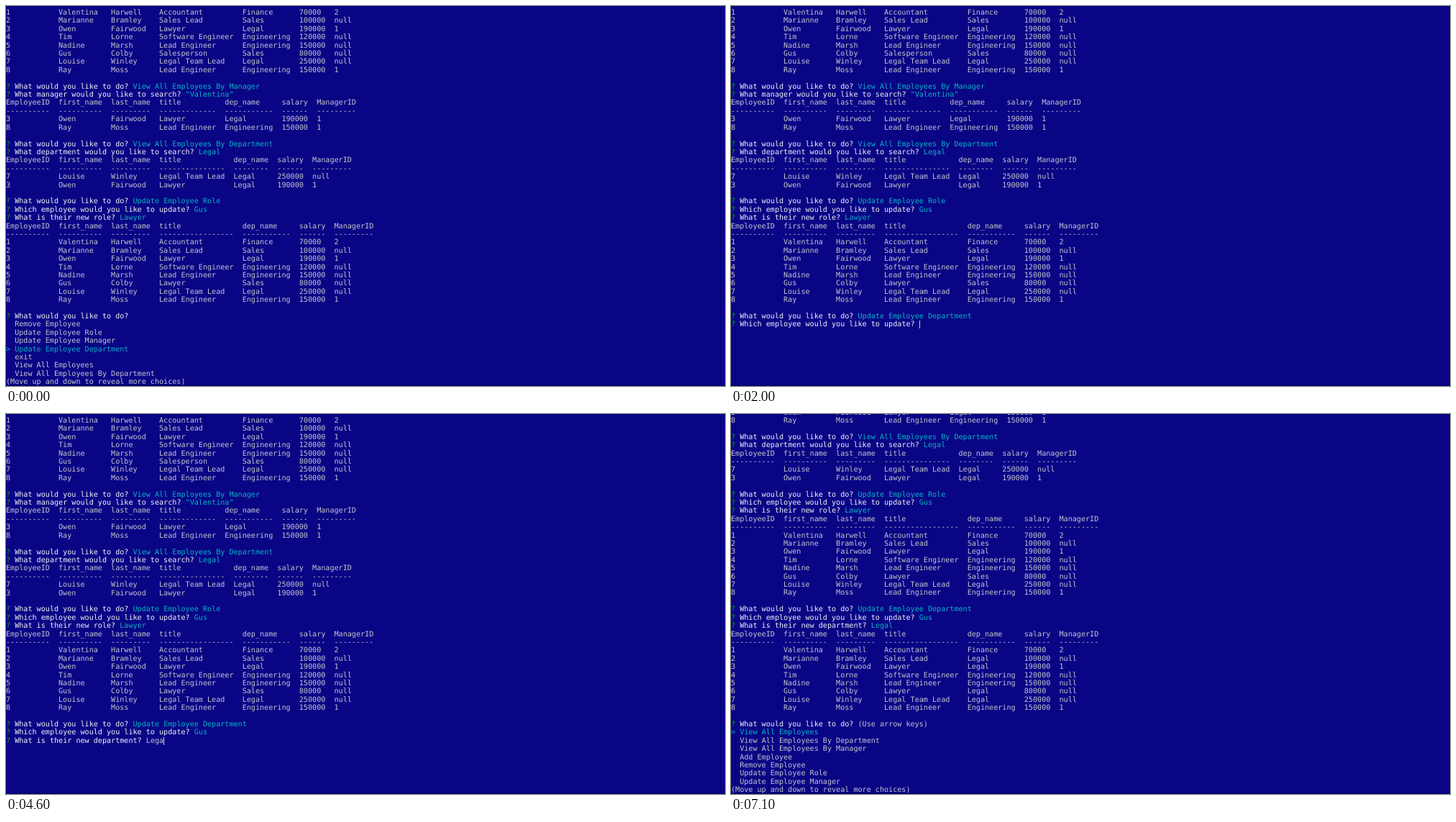
These frames come from a looping animation (1000x528 px, 7.2 s). An HTML page:

```html
<!DOCTYPE html>
<html lang="en">
<head>
<meta charset="utf-8">
<title>Employee tracker</title>
<style>
  html, body { margin: 0; width: 100%; height: 100%; overflow: hidden; background: #090585; }
  #stage { position: relative; width: 1000px; height: 528px; overflow: hidden; }
  #stage::after { content: ""; position: absolute; left: 0; right: 0; bottom: 0; height: 1px; background: #05035c; }
  #term {
    position: absolute; left: 0; margin: 0; color: #c6c6ce;
    font: 10.12px/11.41px "DejaVu Sans Mono", "Liberation Mono", monospace;
    text-rendering: geometricPrecision; font-variant-ligatures: none;
  }
  .ask { color: #f4f4f8; }
  .mark { color: #12a02a; }
  .pick { color: #08b4c4; }
  .caret { position: absolute; width: 1px; height: 11px; background: #d0d0d8; }
  #mouse {
    position: absolute; left: 152px; top: 480px; width: 6px; height: 11px;
    animation: drift 7.2s linear infinite;
  }
  @keyframes drift {
    0%, 2.77% { visibility: hidden; }
    2.78%, 9.8% { visibility: visible; transform: none; }
    15.2%, 22.21% { visibility: visible; transform: translate(1px, -1px); }
    22.22%, 100% { visibility: hidden; transform: translate(1px, -1px); }
  }
</style>
</head>
<body>
<div id="stage">
  <pre id="term"></pre>
  <svg id="mouse" viewBox="0 0 6 11"><path d="M1 .5H5M3 .5V10.5M1 10.5H5" fill="none" stroke="#04022c"/></svg>
</div>
<script>
const LOOP = 7200, ROW = 11.41, TOP = 4;
const term = document.getElementById("term");

const heads = ["EmployeeID", "first_name", "last_name", "title", "dep_name", "salary", "ManagerID"];
const staff = [
  "1,Valentina,Harwell,Accountant,Finance,70000,2",
  "2,Marianne,Bramley,Sales Lead,Sales,100000,null",
  "3,Owen,Fairwood,Lawyer,Legal,190000,1",
  "4,Tim,Lorne,Software Engineer,Engineering,120000,null",
  "5,Nadine,Marsh,Lead Engineer,Engineering,150000,null",
  "6,Gus,Colby,Salesperson,Sales,80000,null",
  "7,Louise,Winley,Legal Team Lead,Legal,250000,null",
  "8,Ray,Moss,Lead Engineer,Engineering,150000,1"
].map(line => line.split(","));

const TITLE = 3, DEP = 4;
const change = (rows, id, col, value) =>
  rows.map(r => r[0] === id ? r.map((v, i) => i === col ? value : v) : r);
const withRole = change(staff, "6", TITLE, "Lawyer");
const withDep = change(change(withRole, "6", DEP, "Legal"), "2", DEP, "Legal");

function table(rows) {
  const widths = heads.map((h, i) => Math.max(h.length, ...rows.map(r => r[i].length)));
  const line = cells => cells.map((c, i) => c.padEnd(widths[i])).join("  ");
  return [line(heads), line(widths.map(w => "-".repeat(w))), ...rows.map(line), ""];
}

const span = (cls, text) => `<span class="${cls}">${text}</span>`;
const caret = span("caret", "");
const ask = (text, rest = "") => `${span("mark", "?")} ${span("ask", text)} ${rest}`;
const answer = (text, value) => ask(text, span("pick", value));

const TODO = "What would you like to do?";
const WHO = "Which employee would you like to update?";
const WHERE = "What is their new department?";

function menu(items, chosen) {
  return [
    ...items.map(s => s === chosen ? span("pick", "&gt; " + s) : "  " + s),
    "(Move up and down to reveal more choices)"
  ];
}

const all = "View All Employees", byDep = all + " By Department", byMgr = all + " By Manager";
const remove = "Remove Employee", upRole = "Update Employee Role";
const upMgr = "Update Employee Manager", upDep = "Update Employee Department";

const history = [
  ...table(staff).slice(2),
  answer(TODO, byMgr),
  answer("What manager would you like to search?", '"Valentina"'),
  ...table([staff[2], staff[7]]),
  answer(TODO, byDep),
  answer("What department would you like to search?", "Legal"),
  ...table([staff[6], staff[2]]),
  answer(TODO, upRole),
  answer(WHO, "Gus"),
  answer("What is their new role?", "Lawyer"),
  ...table(withRole)
];

const firstMenu = [ask(TODO), ...menu([remove, upRole, upMgr, upDep, "exit", all, byDep], upDep)];
const lastMenu = [
  ask(TODO, "(Use arrow keys)"),
  ...menu([all, byDep, byMgr, "Add Employee", remove, upRole, upMgr], all)
];

// Key press times for the two typed answers
const whoKeys = [2600, 2700, 2800];
const whereKeys = [4000, 4200, 4400, 4600, 4700];
const typed = (text, keys, t) => text.slice(0, keys.filter(k => t >= k).length) + caret;

function tail(t) {
  if (t < 1600) return firstMenu;
  const chosen = answer(TODO, upDep);
  if (t < 3500) return [chosen, ask(WHO, typed("Gus", whoKeys, t))];
  const who = answer(WHO, "Gus");
  if (t < 5000) return [chosen, who, ask(WHERE, typed("Legal", whereKeys, t))];
  return [chosen, who, answer(WHERE, "Legal"), ...table(withDep), ...lastMenu];
}

let shown = "";
function draw(now) {
  const t = now % LOOP;
  const html = [...history, ...tail(t)].join("\n");
  if (html !== shown) {
    term.innerHTML = shown = html;
    term.style.top = TOP - (t < 5000 ? 0 : 14 * ROW) + "px";
  }
  requestAnimationFrame(draw);
}
draw(performance.now());
</script>
</body>
</html>
```
